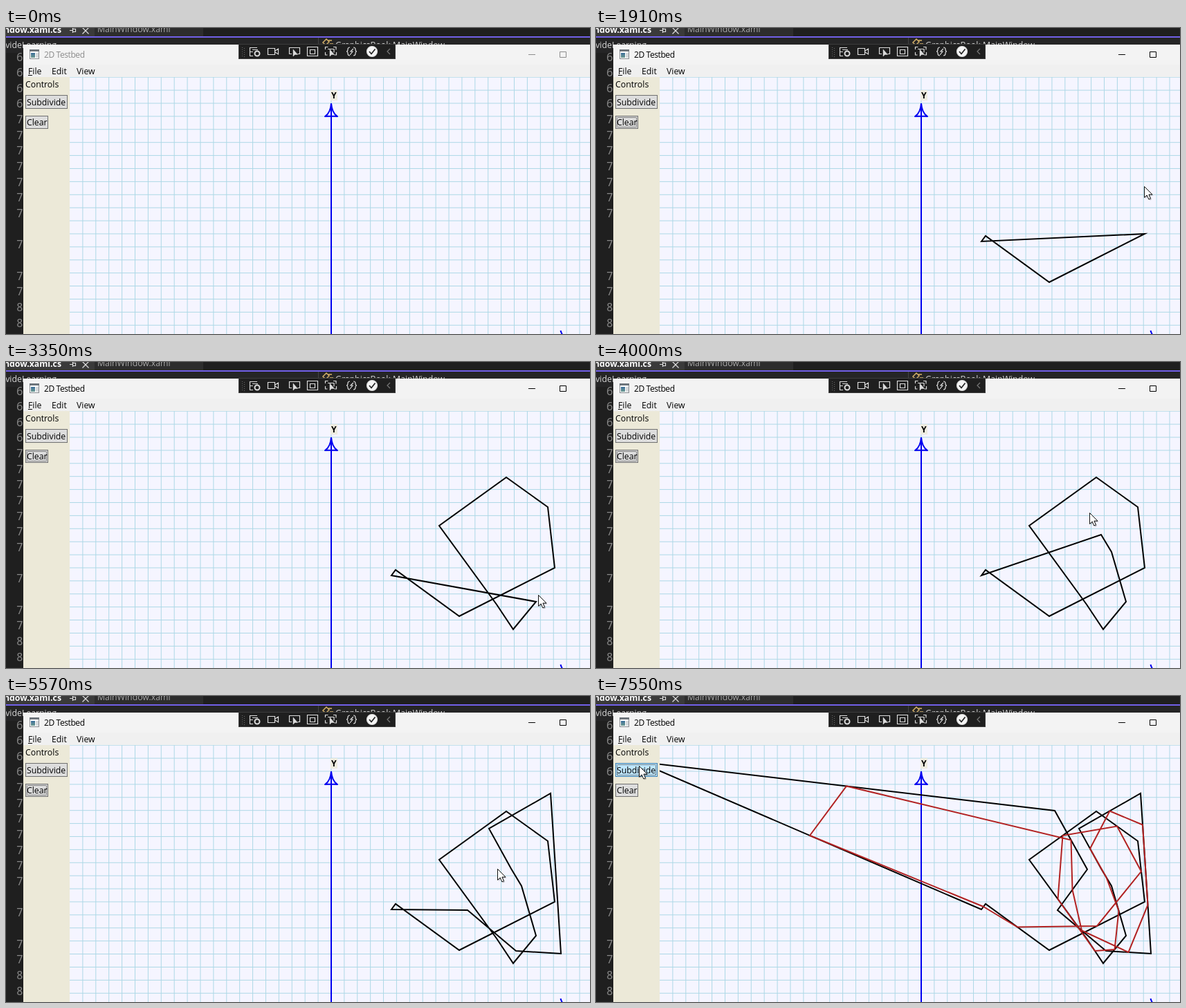
Animation, 844 px wide and 443 px high, one loop 8000 ms. Source, as an HTML page:

```html
<!DOCTYPE html>
<html lang="en">
<head>
<meta charset="utf-8">
<title>2D Testbed</title>
<style>
  html, body { margin: 0; width: 100%; height: 100%; overflow: hidden; background: #1f1f1f; }
  svg { display: block; width: 844px; height: 443px; }
  text { font-family: "Open Sans", "Noto Sans", sans-serif; font-size: 12.3px; }
  .num { font: 16px "Noto Sans Mono", "DejaVu Sans Mono", monospace; fill: #858585; }
  .crisp { shape-rendering: crispEdges; }
  .line { fill: none; stroke-width: 2; stroke-miterlimit: 10; }
  .focus { fill: none; stroke: #222; stroke-dasharray: 1 1; stroke-dashoffset: .5; }
</style>
</head>
<body>
<svg viewBox="0 0 844 443">
  <defs>
    <clipPath id="view"><rect x="92" y="71" width="752" height="372"/></clipPath>
    <linearGradient id="pane" x2="0" y2="1">
      <stop stop-color="#3c6f9c"/><stop offset="1" stop-color="#6f9b92"/>
    </linearGradient>
    <path id="arrow" d="M0 0V16L3.700 12.500 6.300 18.500 9 17.300 6.400 11.600H11.500Z"/>
  </defs>

  <!-- editor behind the window -->
  <rect width="844" height="443" fill="#1f1f1f"/>
  <rect width="128" height="12" fill="#3a3a3a"/>
  <rect x="128" width="157" height="12" fill="#2d2d2d"/>
  <rect y="12" width="844" height="2" fill="#7160e8"/>
  <text x="80" y="7" text-anchor="end" font-weight="bold" fill="#fff">MainWindow.xaml.cs</text>
  <text x="132" y="6" fill="#a8a8a8">MainWindow.xaml</text>
  <path d="M92 3.500h4M96.500 0v7M97 1.500h3.500v4H97M110.500 -.500l9 9M119.500 -.500l-9 9" fill="none" stroke="#e0e0e0" stroke-width="1.200"/>
  <rect y="14" width="844" height="22" fill="#252526"/>
  <path d="M451.500 14v10" stroke="#444"/>
  <text x="73" y="29" text-anchor="end" fill="#d6d6d6">SubdivideLearning</text>
  <path d="M458 21l5-5 4 4-5 5zM466 18h5M468 23h5" fill="none" stroke="#d8b36a" stroke-width="1.500"/>
  <text x="476" y="29" fill="#d6d6d6">GraphicsBook.MainWindow</text>
  <g id="nums"></g>

  <!-- application window -->
  <rect x="25" y="24" width="819" height="30" fill="#f3f3f3"/>
  <rect x="25" y="53" width="819" height="18" fill="#f0f0f0"/>
  <rect x="25" y="71" width="67" height="372" fill="#ece9d8"/>
  <rect x="92" y="71" width="752" height="372" fill="#f5f5ff"/>
  <rect x="34.500" y="31.500" width="13" height="13" fill="#fff" stroke="#85898e"/>
  <rect x="34" y="31" width="14" height="3" fill="#6d747b"/>
  <rect x="36" y="36" width="6" height="7" fill="url(#pane)"/>
  <rect x="43" y="36" width="4" height="7" fill="#d4d8dc"/>
  <g id="caption">
    <text x="55" y="43" style="font-size:12px;letter-spacing:-.4px">2D Testbed</text>
    <path d="M755 38.500h10M800.500 34.500h9v8h-9z" fill="none" stroke="currentColor"/>
  </g>
  <text x="32" y="67">File</text>
  <path d="M32 68.500h6" stroke="#000"/>
  <text x="66" y="67">Edit</text>
  <text x="102" y="67">View</text>
  <text x="28" y="86">Controls</text>
  <rect id="button" class="crisp" x="28.500" y="97.500" width="60" height="19"/>
  <text x="30" y="112">Subdivide</text>
  <rect class="crisp" x="28.500" y="127.500" width="32" height="18" fill="#ddd" stroke="#707070"/>
  <text x="30" y="141">Clear</text>
  <rect id="focusA" class="focus" x="30.500" y="99.500" width="56" height="15"/>
  <rect id="focusB" class="focus" x="30.500" y="129.500" width="28" height="14"/>

  <!-- drawing area -->
  <g clip-path="url(#view)">
    <path id="grid" stroke="#add8e6" fill="none"/>
    <rect x="469" y="90" width="10" height="15" fill="#eeecdf"/>
    <text x="470" y="102" font-weight="bold">Y</text>
    <path class="line" stroke="#0000f0" stroke-linejoin="round" d="M470 109V443M470 109Q469 123 461 128Q470 127 479 128Q471 123 470 109M801.500 438Q802 441 806 447"/>
    <path id="poly" class="line" stroke="#000"/>
    <path id="mids" class="line" stroke="#b22222"/>
  </g>

  <!-- debug toolbar -->
  <rect x="336.500" y="23.500" width="226" height="21" fill="#1f1f1f" stroke="#3d3d3d"/>
  <g fill="none" stroke="#dcdcdc" stroke-width="1.200">
    <path d="M341.500 28v13M344.500 29v13" stroke="#666" stroke-dasharray="1 2"/>
    <path d="M352 28.500h11M352.500 28v12M352 34.500h5M352 40.500h5M356 31.500h8"/>
    <circle cx="363" cy="37" r="3.500" stroke-width="2"/>
    <path d="M378.500 29.500h10v9h-10zM389 33l4.500-3v8l-4.500-3"/>
    <path d="M413 37.500h-3.500v-9h15v9h-3"/>
    <path d="M435.500 27.500h15v13h-15zM439.500 31.500h7v6h-7z"/>
    <path d="M461.500 31v-3.500h4M473 27.500h4v4M477.500 35v4h-3M461.500 35v4h3M465 30.500h9v5"/>
    <path d="M497 28q-3 0-3 3t-2 3q2 0 2 3t3 3M502 28q3 0 3 3t2 3q-2 0-2 3t-3 3M502 30l-4 4h3l-4 5"/>
    <path d="M415 31v10l2.500-2.500h4zM468 31v10l2.500-2.500h4z" fill="#dcdcdc" stroke-width=".5"/>
    <circle cx="529" cy="34" r="7.500" fill="#f5f5f5"/>
    <path d="M525 34l3 3.500 5.500-7" stroke="#222" stroke-width="1.700"/>
    <path d="M555 30l-4 4 4 4" stroke="#777"/>
  </g>

  <g id="cursor">
    <use href="#arrow" x="2" y="2" opacity=".25"/>
    <use href="#arrow" x=".5" y=".5" fill="#fff" stroke="#111"/>
  </g>
</svg>
<script>
const LOOP = 8000, CELL = 96 / 5.08;
const STEP = 130.6, PHASE = 1390;
const ACTIVE = 600, HOVER = 6760, PRESS = 7150, DONE = 7550;
const $ = id => document.getElementById(id);
const parse = s => s.split(" ").map(p => p.split(",").map(Number));

const verts = parse("557,309 563,301 655,368 793,298 783,210 723,167 626,237 " +
  "709,351 733,387 766,347 745,275 730,250 698,192 787,141 793,232 802,373 " +
  "737,369 667,310 710,251 663,166");
const stray = [61, 95];   // the press on the button also adds a vertex

// two slow clicks, then a steady rhythm
const clickTime = i => i < 2 ? ACTIVE + 460 * i : 1000 + 260 * i;

// pointer between and after the clicks: time,x,y
const moves = parse("130,597,329 400,554,309 1910,792,229 3350,769,336 " +
  "4655,808,362 5570,710,250 6090,631,168 6290,430,180 6560,77,218 6760,63,102 7550,62,101");
const trail = [...verts.map((v, i) => [clickTime(i), ...v]), ...moves].sort((a, b) => a[0] - b[0]);

const snap = t => PHASE + STEP * Math.floor((t + 5 - PHASE) / STEP);
const mix = (a, b, k) => a + (b - a) * k;

function pointer(t) {
  const next = trail.findIndex(p => p[0] > t);
  if (next < 1) return trail.at(next).slice(1);
  const [t0, x0, y0] = trail[next - 1], [t1, x1, y1] = trail[next];
  const k = (t - t0) / (t1 - t0);
  return [mix(x0, x1, k), mix(y0, y1, k)];
}

const closed = pts => pts.length > 1 ? `M${pts.join("L")}Z` : "";

function midpoints(pts) {
  return pts.map(([x, y], i) => {
    const [u, v] = pts[(i + 1) % pts.length];
    return [(x + u) / 2, (y + v) / 2];
  });
}

function set(id, attrs) {
  for (const name in attrs) $(id).setAttribute(name, attrs[name]);
}
const show = (id, on) => set(id, { visibility: on ? "visible" : "hidden" });

function draw(t) {
  const shown = snap(t);
  const pts = verts.filter((v, i) => clickTime(i) <= shown);
  if (t >= PRESS) pts.push(stray);
  const active = t >= ACTIVE, hover = t >= HOVER, done = t >= DONE;
  const ink = active ? "#000" : "#8c8c8c";
  set("poly", { d: closed(pts) });
  set("mids", { d: done ? closed(midpoints(pts)) : "" });
  set("cursor", { transform: `translate(${pointer(shown).map(Math.round)})` });
  set("caption", { fill: ink, color: ink });
  set("button", hover ? { fill: "#bee6fd", stroke: "#3c7fb1" } : { fill: "#ddd", stroke: "#707070" });
  show("cursor", t >= trail[0][0]);
  show("focusA", done);
  show("focusB", active && !done);
}

function build() {
  let d = "", rows = "";
  for (let k = 1; k < 40; k++) d += `M${92 + k * CELL} 71V443`;
  for (let k = 0; k < 20; k++) d += `M92 ${71.2 + k * CELL}H844`;
  set("grid", { d });
  // wrapped lines carry no number
  for (let k = 0, n = 66; k < 18; k++) {
    if (k === 11 || k === 13) continue;
    rows += `<text class="num" x="15" y="${47.5 + k * 22.65}">${Math.floor(n++ / 10)}</text>`;
  }
  $("nums").innerHTML = rows;
}

build();
const origin = performance.now();
function frame() {
  draw((performance.now() - origin) % LOOP);
  requestAnimationFrame(frame);
}
frame();
</script>
</body>
</html>
```
